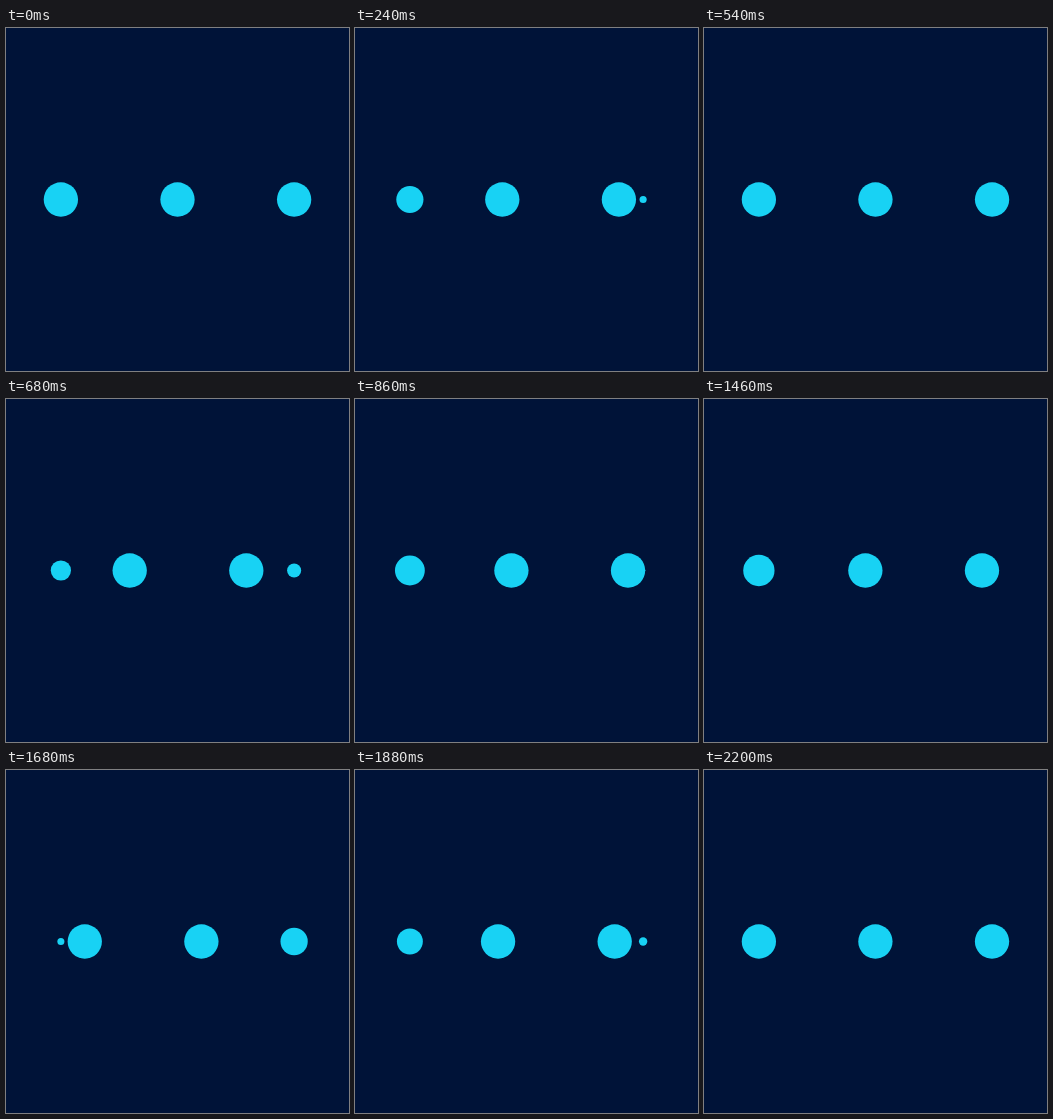
Write an HTML page that moves like this. It is 343 px wide and 343 px high and loops after 2220 ms.

```html
<!DOCTYPE html>
<html lang="en">
<head>
<meta charset="utf-8">
<title>Loading dots</title>
<style>
  html, body { margin: 0; width: 100%; height: 100%; overflow: hidden; background: #001338; }
  svg { display: block; width: 100vw; height: 100vh; }
</style>
</head>
<body>
<svg viewBox="0 0 100 100" fill="#18d2f4">
  <circle cy="50"/><circle cy="50"/><circle cy="50"/><circle cy="50"/>
</svg>
<script>
  const LOOP = 2220, STEP = LOOP / 4, TICK = 20;
  const LEFT = 16, GAP = 34, RADIUS = 5;
  const dots = document.querySelectorAll('circle');

  // cubic-bezier(0, .5, .5, 1), solved for its parameter by bisection
  function ease(x) {
    let lo = 0, hi = 1;
    for (let i = 0; i < 30; i++) {
      const s = (lo + hi) / 2;
      if (1.5 * s * s - 0.5 * s ** 3 < x) lo = s; else hi = s;
    }
    return 1.5 * lo - 0.5 * lo ** 3;
  }

  function place(dot, cx, r) {
    dot.setAttribute('cx', cx);
    dot.setAttribute('r', r);
  }

  // One dot grows, two slide a place to the right, the last one shrinks.
  function draw(time) {
    const t = Math.floor(((time + 0.5) % LOOP) / TICK) * TICK;
    const p = ease((t % STEP) / STEP);
    place(dots[0], LEFT, RADIUS * p);
    place(dots[1], LEFT + GAP * p, RADIUS);
    place(dots[2], LEFT + GAP * (1 + p), RADIUS);
    place(dots[3], LEFT + GAP * 2, RADIUS * (1 - p));
  }

  function frame() {
    draw(performance.now());
    requestAnimationFrame(frame);
  }

  draw(0);
  requestAnimationFrame(frame);
</script>
</body>
</html>
```
